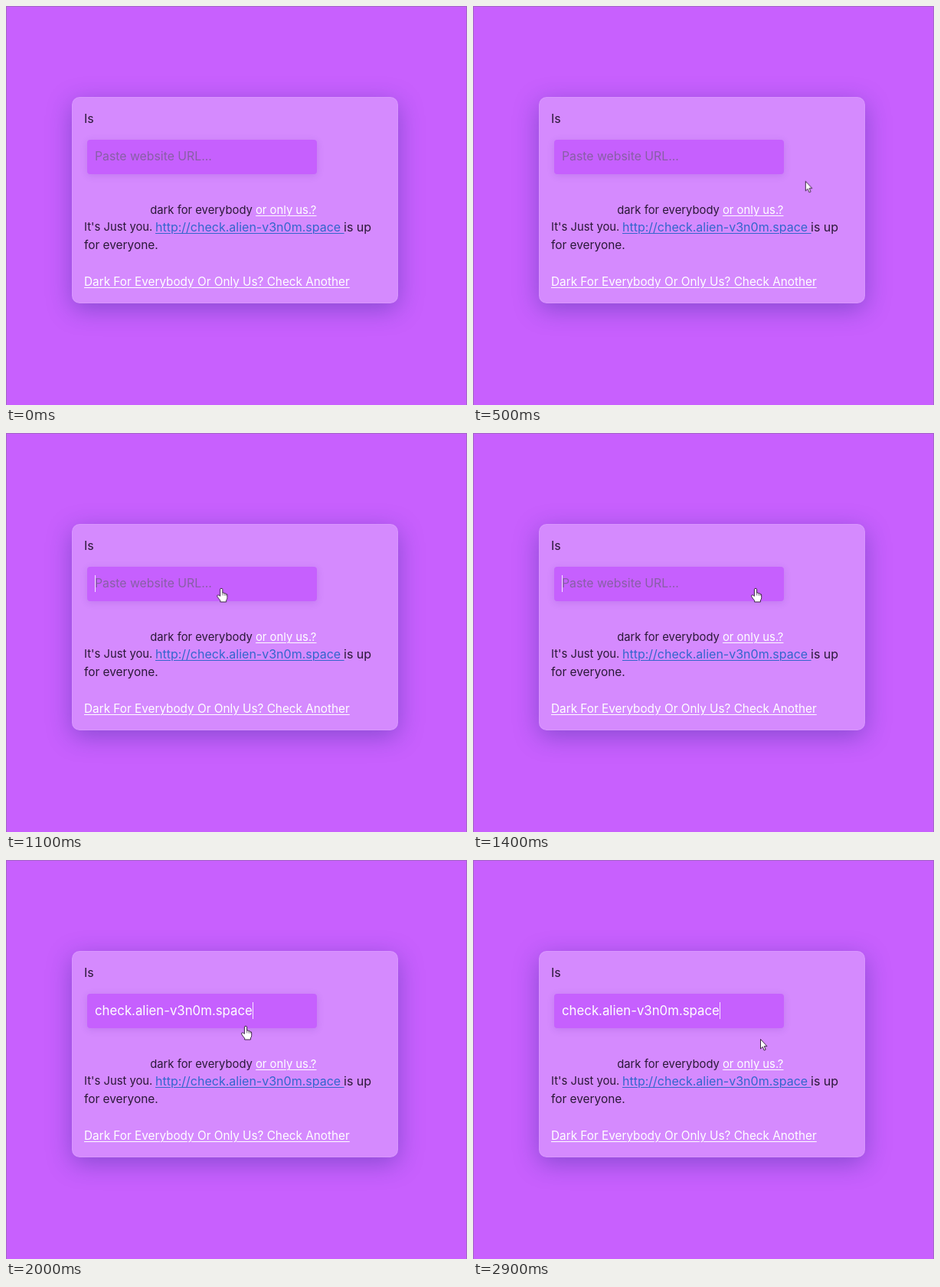
Write an HTML page that moves like this. It is 602 by 522 pixels and loops after 3200 ms.

```html
<!DOCTYPE html>
<html lang="en">
<head>
<meta charset="utf-8">
<title>Site check</title>
<style>
  html, body { margin: 0; width: 100%; height: 100%; overflow: hidden; }
  body { background: #c860fe; }
  * { box-sizing: border-box; }

  .stage {
    position: relative; width: 602px; height: 522px; overflow: hidden;
    background: #c860fe; color: #2a1838;
    font: 16px/20px Inter, "Open Sans", sans-serif;
    --loop: 3200ms linear infinite;
  }
  .edge {
    position: absolute; inset: 0;
    border: 1px solid #a365c6; border-bottom: 0;
  }
  .card {
    position: absolute; left: 86px; top: 119px; width: 426px; height: 270px;
    border-radius: 10px; border: 1px solid rgba(255, 255, 255, .1);
    background: #d58afe;
    box-shadow: 0 8px 32px rgba(31, 38, 135, .37);
  }
  .field {
    position: absolute; left: 106px; top: 175px; width: 300px; height: 45px;
    border-radius: 4px; background: #c660fe;
    box-shadow: 0 2px 10px rgba(90, 40, 160, .16);
  }

  .t { position: absolute; white-space: pre; }
  .t u { text-decoration-thickness: 1px; text-underline-offset: 2px; }
  .white { color: #fff; }
  .link { color: #3366cc; }
  .small { font-size: 14.8px; }

  .hint { color: #875fa6; font-size: 15.8px; animation: hint var(--loop); }
  .value { color: #fff; font-size: 16.8px; animation: value var(--loop); }
  .t i {
    position: absolute; top: -1px; width: 1px; height: 22px;
    background: rgba(255, 255, 255, .85);
  }
  .hint i { left: 0; animation: caret-empty var(--loop); }
  .value i { left: 206px; animation: caret-end var(--loop); }

  .pointer {
    position: absolute; left: 0; top: 0; width: 1px; height: 1px;
    overflow: visible; animation: move var(--loop);
  }
  .pointer path { stroke: #2b1733; stroke-width: .9; stroke-linejoin: round; fill: #fff; }
  .arrow { animation: arrow var(--loop); }
  .hand { animation: hand var(--loop); }

  /* 100 ms = 3.125% */
  @keyframes hint {
    0% { opacity: 1; animation-timing-function: step-end; }
    59.375%, 100% { opacity: 0; }
  }
  @keyframes value {
    0% { opacity: 0; animation-timing-function: step-end; }
    59.375%, 100% { opacity: 1; }
  }
  @keyframes caret-empty {
    0% { opacity: 0; animation-timing-function: step-end; }
    31.25% { opacity: 1; animation-timing-function: step-end; }
    46.875%, 100% { opacity: 0; }
  }
  @keyframes caret-end {
    0% { opacity: 1; animation-timing-function: step-end; }
    75% { opacity: 0; animation-timing-function: step-end; }
    90.625%, 100% { opacity: 1; }
  }
  @keyframes arrow {
    0% { opacity: 0; animation-timing-function: step-end; }
    3.125% { opacity: 1; animation-timing-function: step-end; }
    21.875% { opacity: 0; animation-timing-function: step-end; }
    65.625%, 100% { opacity: 1; }
  }
  @keyframes hand {
    0% { opacity: 0; animation-timing-function: step-end; }
    21.875% { opacity: 1; animation-timing-function: step-end; }
    65.625%, 100% { opacity: 0; }
  }
  @keyframes move {
    0%, 3.125% { transform: translate(600px, 258px); animation-timing-function: steps(2); }
    9.375% { transform: translate(555px, 246px); animation-timing-function: steps(5); }
    25% { transform: translate(252px, 203px); }
    31.25% { transform: translate(252px, 203px); animation-timing-function: steps(4); }
    43.75% { transform: translate(369px, 203px); animation-timing-function: steps(6); }
    62.5% { transform: translate(313px, 217px); animation-timing-function: steps(4); }
    75%, 100% { transform: translate(375px, 234px); }
  }
</style>
</head>
<body>
<div class="stage">
  <div class="card"></div>
  <div class="field"></div>

  <div class="t" style="left:102px;top:137px">Is</div>
  <div class="t hint" style="left:116px;top:187px">Paste website URL...<i></i></div>
  <div class="t value" style="left:116px;top:187px">check.alien-v3n0m.space<i></i></div>

  <div class="t small" style="right:276px;top:257px">dark for everybody </div>
  <div class="t small white" style="left:326px;top:257px"><u>or only us.?</u></div>

  <div class="t small" style="left:102px;top:279px">It's Just you.</div>
  <div class="t link" style="left:195px;top:279px"><u>http://check.alien-v3n0m.space </u></div>
  <div class="t" style="left:441px;top:279px">is up</div>
  <div class="t" style="left:102px;top:303px;font-size:15.4px">for everyone.</div>

  <div class="t white" style="left:102px;top:351px;font-size:15.3px"><u>Dark For Everybody Or Only Us? Check Another</u></div>

  <div class="edge"></div>
  <svg class="pointer" viewBox="0 0 1 1">
    <path class="arrow" d="M.5 .5V13L3.3 10.4 5.2 15 7.2 14.1 5.3 9.7H9Z"/>
    <g class="hand">
      <path d="M-1.6 10.5V1.8Q-1.6 .3 0 .3T1.6 1.8V6.2Q3.3 5.2 4 6.9 5.6 6 6 7.8 7.7 7.4 7.7 9V12.5Q7.7 14.4 6.4 16V18H-1.4V16.2Q-3.4 14-5.1 11.2-6 9.6-4.8 9-3.8 8.6-2.8 9.5Z"/>
      <path d="M1.6 6.2V9.5M4 6.9V9.8M6 7.8V10" fill="none" style="stroke-width:.6"/>
    </g>
  </svg>
</div>
</body>
</html>
```
